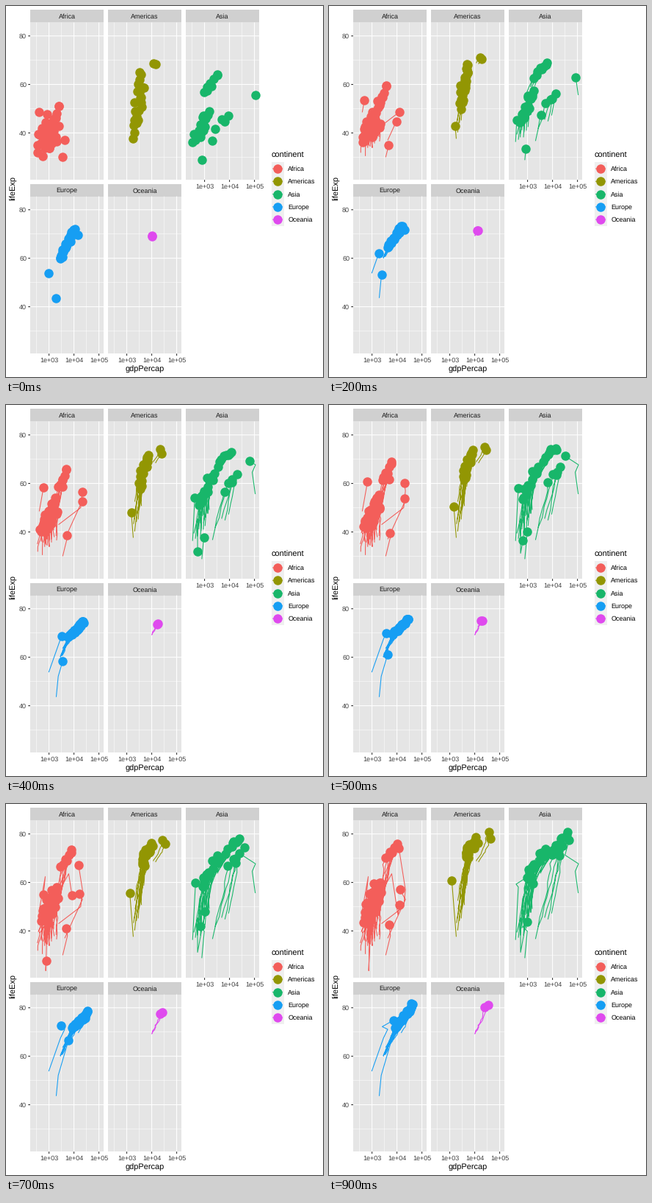
Recreate the animation shown at these times as a matplotlib script. Size 432 by 504 pixels, loop 1 s.

```python
import numpy as np
import matplotlib.pyplot as plt
from matplotlib.animation import FuncAnimation
from matplotlib.patches import Rectangle

plt.rcParams.update({"font.family": "Liberation Sans", "text.hinting": "none",
                     "text.hinting_factor": 1})
W, H, DPI = 432, 504, 72
FRAMES, SPAN = 10, 55
YEARS = np.arange(0, SPAN + 1, 5)
rng = np.random.default_rng(11)

COLORS = {"Africa": "#F35E5A", "Americas": "#929603", "Asia": "#18B66A",
          "Europe": "#169EF3", "Oceania": "#DF4AEE"}
PANEL_W, PANEL_H, PITCH_X, PITCH_Y = 100, 213.8, 106, 236.1
LEFT, TOP, STRIP = 33, 22.4, 17
X_MIN, X_RANGE, Y_MAX, Y_RANGE = 2.248, 2.940, 85.55, 64.9
LINE = 1.07


def scatter_along(low, high, count, spread):
    """Points (log income, life) strewn around the line from low to high."""
    rank = np.linspace(0, 1, count)[:, None]
    centre = np.array(low) + (np.array(high) - low) * rank
    return centre + rng.uniform(-1, 1, (count, 2)) * spread


def bent(start, end, bend, noise):
    """Five-yearly values whose growth comes early for a positive bend."""
    u = YEARS / SPAN
    arch = u * (1 - u)
    wobble = rng.normal(0, noise, len(u)) * (arch > 0)
    return start + (end - start) * (u + bend * arch) + wobble


def group(count, start, end, income_bend=0.0, spread=(0, 0)):
    """Countries drifting from one slanted cloud to another."""
    paths = []
    for (g0, l0), (g1, l1) in zip(scatter_along(*start, count, spread),
                                  scatter_along(*end, count, np.multiply(spread, 0.8))):
        life_bend = np.interp(l0, [40, 60, 70], [0.5, 0.8, -0.3])
        paths.append((YEARS, bent(g0, g1, income_bend, 0.02), bent(l0, l1, life_bend, 0.2)))
    return paths


def route(*stops):
    """A single path through (year, log income, life) stops."""
    return [tuple(np.array(stops, float).T)]


PATHS = {
    "Africa":
        group(39, [(2.68, 35), (3.2, 42)], [(2.8, 47), (3.3, 59)], 0.4, (0.2, 5))
        + group(7, [(3.15, 42), (3.42, 52)], [(3.55, 70), (4.03, 76)], 0.4, (0.04, 1))
        + route((0, 2.69, 40), (35, 2.93, 44), (40, 2.87, 23.6), (55, 2.94, 46))
        + route((0, 3.38, 43), (15, 4.27, 50), (25, 4.34, 57), (55, 4.08, 74))
        + route((0, 3.63, 37), (25, 4.34, 53), (55, 4.12, 57))
        + route((0, 2.93, 47.6), (35, 3.79, 63.6), (50, 4.04, 46.6), (55, 4.1, 50.7))
        + route((0, 2.61, 48.5), (35, 2.85, 62.4), (55, 2.67, 43.5))
        + route((0, 3.55, 30), (20, 3.74, 38), (55, 3.68, 42.7)),
    "Americas":
        group(22, [(3.36, 42), (3.6, 64.5)], [(3.57, 70.5), (4.1, 78)], 0.6, (0.14, 2))
        + group(2, [(4.06, 68.8), (4.15, 68.4)], [(4.56, 80.7), (4.63, 78.2)], 0.2)
        + route((0, 3.26, 37.6), (55, 3.08, 60.9)),
    "Asia":
        group(16, [(2.66, 37), (3.22, 50)], [(2.98, 62), (3.75, 74)], -0.5, (0.12, 2.5))
        + group(8, [(3.03, 56), (3.55, 64)], [(4.1, 74), (4.62, 81.5)], 0.2, (0.08, 1.2))
        + group(5, [(3.3, 39), (3.95, 49)], [(4.05, 70), (4.42, 75)], 1, (0.1, 3.5))
        + route((0, 5.03, 55.6), (15, 4.91, 64.6), (20, 5.04, 67.7), (30, 4.5, 71.3),
                (55, 4.67, 77.6))
        + route((0, 2.89, 28.8), (30, 2.99, 39.9), (40, 2.81, 41.7), (55, 2.99, 43.8))
        + route((0, 2.57, 39.4), (15, 2.72, 45.4), (25, 2.72, 31.2), (55, 3.23, 59.7))
        + route((0, 2.52, 36.3), (30, 2.63, 58.1), (40, 2.54, 59.3), (55, 2.97, 62.1)),
    "Europe":
        group(27, [(3.43, 59.5), (4.02, 72)], [(4.02, 73), (4.62, 81)], 0.55, (0.07, 0.9))
        + group(1, [(4.17, 69.6)] * 2, [(4.57, 81.7)] * 2, 0.6)
        + route((0, 2.99, 53.8), (20, 3.46, 67.5), (35, 3.63, 71.1), (40, 3.41, 72.2),
                (55, 3.87, 74.9))
        + route((0, 3.29, 43.6), (10, 3.37, 52.1), (55, 3.93, 71.8)),
    "Oceania":
        group(2, [(4.0, 69.1), (4.02, 69.4)], [(4.54, 81.2), (4.4, 80.2)], 0.2),
}

fig = plt.figure(figsize=(W / DPI, H / DPI), dpi=DPI, facecolor="white")
ax = fig.add_axes([0, 0, 1, 1])
ax.set(xlim=(0, W), ylim=(H, 0))
ax.axis("off")


def box(x, y, w, h, color):
    ax.add_patch(Rectangle((x, y), w, h, fc=color, lw=0))


def stroke(xs, ys, color, width=LINE):
    return ax.plot(xs, ys, color=color, lw=width, solid_capstyle="butt", snap=False)[0]


def dots(xs, ys, color):
    return ax.plot(xs, ys, "o", color=color, ms=12.5, mew=0)[0]


def label(x, y, text, size=9, color="black", ha="center", **kw):
    ax.text(x, y, text, size=size, color=color, ha=ha, va="baseline", **kw)


def to_x(col, log_income):
    return LEFT + PITCH_X * col + (log_income - X_MIN) / X_RANGE * PANEL_W


def to_y(row, life):
    return TOP + PITCH_Y * row + (Y_MAX - life) / Y_RANGE * PANEL_H


def draw_panel(index, name):
    row, col = divmod(index, 3)
    x, y = LEFT + PITCH_X * col, TOP + PITCH_Y * row
    right, bottom = x + PANEL_W, y + PANEL_H
    box(x, y, PANEL_W, PANEL_H, "#E5E5E5")
    box(x, y - STRIP, PANEL_W, STRIP, "#D0D0D0")
    label(x + PANEL_W / 2, y - 5, name, color="#1A1A1A")
    for shift, width in ((0.5, LINE / 2), (0, LINE)):
        for step in (2, 3, 4):
            life, power = 20 * (step - shift), step + 1 - shift
            stroke([x, right], [to_y(row, life)] * 2, "white", width)
            stroke([to_x(col, power)] * 2, [y, bottom], "white", width)
    if col == 0:
        for life in (40, 60, 80):
            ty = to_y(row, life)
            stroke([x - 2.75, x], [ty, ty], "#2A2A2A")
            label(x - 4.9, ty + 3.1, str(life), color="#404040", ha="right")
    if row == 1 or col == 2:
        for power in (3, 4, 5):
            tx = to_x(col, power)
            stroke([tx, tx], [bottom, bottom + 2.75], "#2A2A2A")
            label(tx, bottom + 11.3, f"1e+0{power}", color="#404040")


trails, heads = {}, {}
for i, (name, color) in enumerate(COLORS.items()):
    draw_panel(i, name)
    trails[name], heads[name] = stroke([], [], color), dots([], [], color)
    key_y = 221 + 17.28 * i
    box(361.5, key_y - 8.64, 17.28, 17.28, "#EFEFEF")
    stroke([363.2, 377.1], [key_y, key_y], color)
    dots([370.1], [key_y], color)
    label(384.3, key_y + 3.1, name, ha="left")

label(189, 497, "gdpPercap", 11)
label(12.5, 247.5, "lifeExp", 11, rotation=90, rotation_mode="anchor")
label(361.5, 206, "continent", 11, ha="left")


def update(frame):
    now = SPAN * frame / (FRAMES - 1)
    for i, name in enumerate(COLORS):
        row, col = divmod(i, 3)
        xs, ys, head = [], [], []
        for year, income, life in PATHS[name]:
            tip = np.interp(now, year, income), np.interp(now, year, life)
            past = year <= now
            xs += [*income[past], tip[0], np.nan]
            ys += [*life[past], tip[1], np.nan]
            head.append(tip)
        hx, hy = np.array(head).T
        trails[name].set_data(to_x(col, np.array(xs)), to_y(row, np.array(ys)))
        heads[name].set_data(to_x(col, hx), to_y(row, hy))
    return [*trails.values(), *heads.values()]


anim = FuncAnimation(fig, update, frames=FRAMES, interval=100, repeat=True,
                     repeat_delay=0, blit=False)
plt.show()
```
